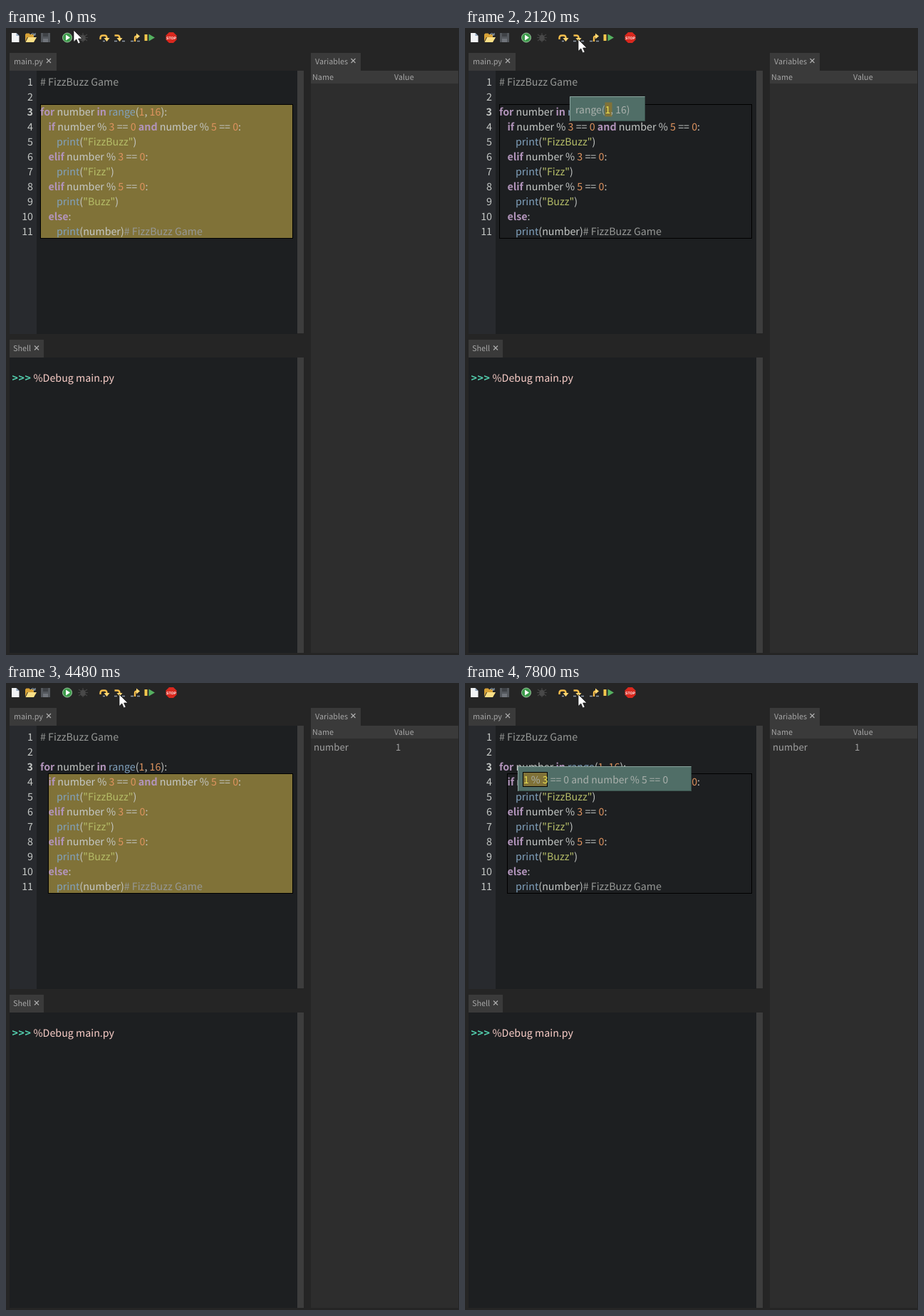
Recreate the animation shown at these times as an HTML page. Size 636 by 881 pixels, loop 8 s.

```html
<!DOCTYPE html>
<html lang="en">
<head>
<meta charset="utf-8">
<title>Stepping through FizzBuzz</title>
<style>
  html, body { margin: 0; width: 100%; height: 100%; overflow: hidden; background: #252525; }
  svg { display: block; width: 636px; height: 881px; }
  text {
    font-family: "Noto Sans CJK JP", "Noto Sans CJK SC", "Noto Sans CJK", "Noto Sans", sans-serif;
    white-space: pre; text-rendering: geometricPrecision; fill: #c5c8c6;
  }
  .code { font-size: 14.25px; }
  .ui { font-size: 10.8px; fill: #a6a6a6; }
  .pop { font-size: 13.95px; fill: #aab0ac; }
  .cell { font-size: 13.2px; fill: #a0a0a0; }
  .num { text-anchor: end; }
  .bold { font-weight: 700; }
  .kw { font-weight: 700; fill: #b294bb; }
  .fn { fill: #81a2be; }
  .lit { fill: #de935f; }
  .str { fill: #b5bd68; }
  .com { fill: #969896; }
  .val { fill: #ebe253; }
  .close { stroke: #b0b0b0; stroke-width: 1.1; }
  .step { fill: none; stroke: #f5bd4b; stroke-width: 2.4; }
  .head { fill: #ffd873; }
  .dash { stroke: #8f9aa8; stroke-width: 1.4; }
</style>
</head>
<body>
<svg viewBox="0 0 636 881">
  <rect width="636" height="881" fill="#252525"/>

  <!-- panels -->
  <g fill="#3a3a3a">
    <rect x="5" y="35" width="66" height="25"/>
    <rect x="5" y="438" width="48" height="25"/>
    <rect x="428" y="35" width="70" height="25"/>
  </g>
  <rect x="5" y="60" width="404" height="370" fill="#1d1f21"/>
  <rect x="5" y="60" width="38" height="370" fill="#282a2e"/>
  <rect x="5" y="463" width="404" height="415" fill="#1d1f21"/>
  <rect x="409" y="60" width="9" height="369" fill="#3d3d3d"/>
  <rect x="409" y="463" width="9" height="415" fill="#3d3d3d"/>
  <rect x="428" y="60" width="207" height="818" fill="#2d2d2d"/>
  <rect x="428" y="60" width="207" height="18" fill="#3a3a3a"/>
  <text class="ui" x="11" y="51">main.py</text>
  <text class="ui" x="10" y="454">Shell</text>
  <text class="ui" x="434" y="51">Variables</text>
  <text class="ui" x="430" y="73">Name</text>
  <text class="ui" x="545" y="73">Value</text>
  <path class="close" d="M57 43l6 6m0-6l-6 6M40 446.500l6 6m0-6l-6 6M484.500 43l6 6m0-6l-6 6"/>
  <text class="code bold" x="8.500" y="497" style="fill:#54d1b0;letter-spacing:.6px">&gt;&gt;&gt;</text>
  <text class="code" x="38.500" y="497" style="fill:#fbcfc9">%Debug main.py</text>
  <g id="vars">
    <text class="cell" x="432" y="95">number</text>
    <text class="cell" x="547" y="95">1</text>
  </g>

  <g id="blocks"></g>
  <g id="code"></g>
  <g id="popups"></g>

  <!-- toolbar -->
  <path d="M8 7h6.500l4 4v9H8z" fill="#f1f3f5"/><path d="M14.500 7v4h4z" fill="#8fa6bf"/>
  <path d="M27 19V9l1.500-1.500h4L34 9h5v4H30z" fill="#d7a136"/>
  <path d="M27.500 20l3.500-7h12l-4 7z" fill="#fadf86"/>
  <path d="M35 9q3-3 5 0m1-2v3h-3" fill="none" stroke="#9db4cc"/>
  <path d="M49 7h13v13H49z" fill="#54585d"/><path d="M52 7h7v5h-7z" fill="#3f4246"/><path d="M52 15h7v5h-7z" fill="#70747a"/>
  <circle cx="86" cy="13.500" r="6.500" fill="#3c9a4a" stroke="#b7dcb9" stroke-width=".8"/>
  <path d="M84 9.500l6 4-6 4z" fill="#fff"/>
  <path d="M102 9l12 9m0-9l-12 9M101 13.500h14M108 7v13" stroke="#444" stroke-width="1.200"/>
  <ellipse cx="108" cy="14" rx="3.600" ry="4.500" fill="#484848"/>
  <rect id="hover" x="150" y="5" width="18" height="18.500" fill="#3c3c3c" stroke="#d0d0d0"/>
  <path class="step" d="M132.500 16v-2q0-3.500 3.500-3.500h2.500q3 0 3 3.500"/>
  <path class="head" d="M137.500 14h8l-4 5z"/>
  <path class="step" d="M152.500 10.500h4q3 0 3 3.500"/>
  <path class="head" d="M155.500 14h8l-4 5z"/>
  <path class="step" d="M181 19v-5q0-2.500 3-2.500"/>
  <path class="head" d="M183 7.500v8l5-4z"/>
  <path class="dash" d="M136 18.500h3M152 18.500h4m7 0h4M175 18.500h4m5 0h4"/>
  <rect x="194.500" y="9" width="4" height="9" fill="#f3c64d"/>
  <path d="M200.500 8.500l8.500 5-8.500 5z" fill="#55b060"/>
  <path d="M229 6h6l4.500 4.500v6L235 21h-6l-4.500-4.500v-6z" fill="#d9281e"/>
  <text x="232" y="15.600" text-anchor="middle" style="font:700 5.200px 'Liberation Sans',sans-serif;fill:#fff">STOP</text>
  <circle id="ring" cx="159" cy="16" r="11.200" fill="#e0d800" fill-opacity=".75"/>
  <path id="cursor" d="M0 0v16.500l3.800-3.600 2.600 6.100 2.800-1.200-2.600-5.800h5.400z" fill="#fff" stroke="#111" stroke-width=".7"/>
</svg>

<script>
const $ = id => document.getElementById(id);
const LOOP = 8000, ROW = 21;

// Code listing
const source = `# FizzBuzz Game

for number in range(1, 16):
    if number % 3 == 0 and number % 5 == 0:
        print("FizzBuzz")
    elif number % 3 == 0:
        print("Fizz")
    elif number % 5 == 0:
        print("Buzz")
    else:
        print(number)# FizzBuzz Game`;
const kinds = ['com', 'str', 'kw', 'fn', 'lit'];
const tokens = /(#.*)|("[^"]*")|\b(for|in|if|elif|else|and)\b|\b(range|print)\b|(\d+)/g;
const paint = line => line.replace(tokens, (word, ...groups) =>
  `<tspan class="${kinds[groups.findIndex(g => g)]}">${word}</tspan>`);

$('code').innerHTML = source.split('\n').map((line, i) => {
  const y = 80.5 + i * ROW, body = line.trimStart();
  const x = 48 + (line.length - body.length) * 2.87;
  return `<text class="code num${i === 2 ? ' bold' : ''}" x="38" y="${y}">${i + 1}</text>` +
    `<text class="code" x="${x}" y="${y}">${paint(body)}</text>`;
}).join('');

// Statement boxes
const block = (x, y) => filled =>
  `<rect x="${x}" y="${y}" width="${402.5 - x}" height="${295.5 - y}" stroke="#000" fill="${filled ? '#807238' : 'none'}"/>`;
const loopBox = block(48.5, 107.5), ifBox = block(59.5, 127.5);

// Expression boxes; values stand between asterisks
const popup = (x, y, w, text, from, to, done) => {
  const frame = `<rect x="${x}" y="${y}" width="${w}" height="35" fill="#506e67"/>` +
    `<path d="M${x + .5} ${y + 35}v-34.500h${w - .5}" fill="none" stroke="#8aa49e"/>` +
    `<path d="M${x + 1} ${y + 34.5}h${w - 1.5}v-34" fill="none" stroke="#3d5650"/>`;
  const focus = `<rect x="${from}" y="${y + 8.5}" width="${to - from}" height="20" fill="#807238" stroke="${done ? 'none' : '#000'}"/>`;
  const label = text.replace(/\*(.+?)\*/g, '<tspan class="val">$1</tspan>');
  return frame + focus + `<text class="pop" x="${x + 8}" y="${y + 24}">${label}</text>`;
};
const rangeBox = (...rest) => [loopBox(false), popup(147, 96, 106, ...rest)];
const testBox = (w, ...rest) => [ifBox(false), popup(74, 117, w, ...rest)];
const test = 'number % 3 == 0 and number % 5 == 0';
const tail = ' == 0 and number % 5 == 0';

// [click, change, release, [block, popup]]
const steps = [
  [0, 0, 0, [loopBox(true), '']],
  [1040, 1120, 1200, rangeBox('range(1, 16)', 154.5, 232.5)],
  [1600, 1680, 1680, rangeBox('range(1, 16)', 196.5, 206.5)],
  [2000, 2080, 2120, rangeBox('range(*1*, 16)', 196.5, 206.5, true)],
  [2280, 2440, 2440, rangeBox('range(*1*, 16)', 211.5, 228.5)],
  [2680, 2760, 2840, rangeBox('range(*1*, *16*)', 212, 229, true)],
  [3040, 3200, 3200, rangeBox('range(*1*, *16*)', 154.5, 232.5)],
  [3440, 3520, 3600, rangeBox('*range(1, 16)*', 154.5, 232.5, true)],
  [3920, 4000, 4000, ['', '']],
  [4320, 4400, 4480, [ifBox(true), '']],
  [4880, 4960, 4960, testBox(282, test, 81.5, 329.5)],
  [5320, 5400, 5480, testBox(282, test, 81.5, 189.5)],
  [5800, 5880, 5880, testBox(282, test, 81.5, 160.5)],
  [6120, 6240, 6240, testBox(282, test, 81.5, 133.5)],
  [6480, 6640, 6640, testBox(244, '*1* % 3' + tail, 81.5, 90.5, true)],
  [6960, 7040, 7080, testBox(244, '*1* % 3' + tail, 106.5, 115.5)],
  [7320, 7400, 7480, testBox(244, '*1* % *3*' + tail, 106.5, 115.5, true)],
  [7640, 7720, 7800, testBox(244, '*1* % *3*' + tail, 81.5, 115.5)]
];
$('blocks').innerHTML = steps.map(s => `<g>${s[3][0]}</g>`).join('');
$('popups').innerHTML = steps.map(s => `<g>${s[3][1]}</g>`).join('');

// Pointer stops: [time, x, y]
const pointer = [
  [0, 95, 3], [80, 84, 9], [160, 77, 15], [240, 100, 20], [320, 150, 22], [400, 200, 22],
  [480, 232, 22], [560, 205, 20], [600, 178, 18], [640, 160, 17], [800, 159.5, 16.5], [880, 159, 16]
];

const show = (el, on) => { el.style.display = on ? '' : 'none'; };

function draw(t) {
  const now = steps.findLastIndex(s => s[1] <= t);
  for (const id of ['blocks', 'popups']) [...$(id).children].forEach((g, i) => show(g, i === now));
  show($('vars'), now >= 9);
  const pressed = steps.some(s => s[0] <= t && t < s[2]);
  show($('ring'), pressed);
  show($('hover'), pressed);
  const [, x, y] = pointer.findLast(p => p[0] <= t);
  $('cursor').setAttribute('transform', `translate(${x} ${y})`);
}

const start = performance.now();
function tick() {
  draw((performance.now() - start) % LOOP);
  requestAnimationFrame(tick);
}
tick();
</script>
</body>
</html>
```
